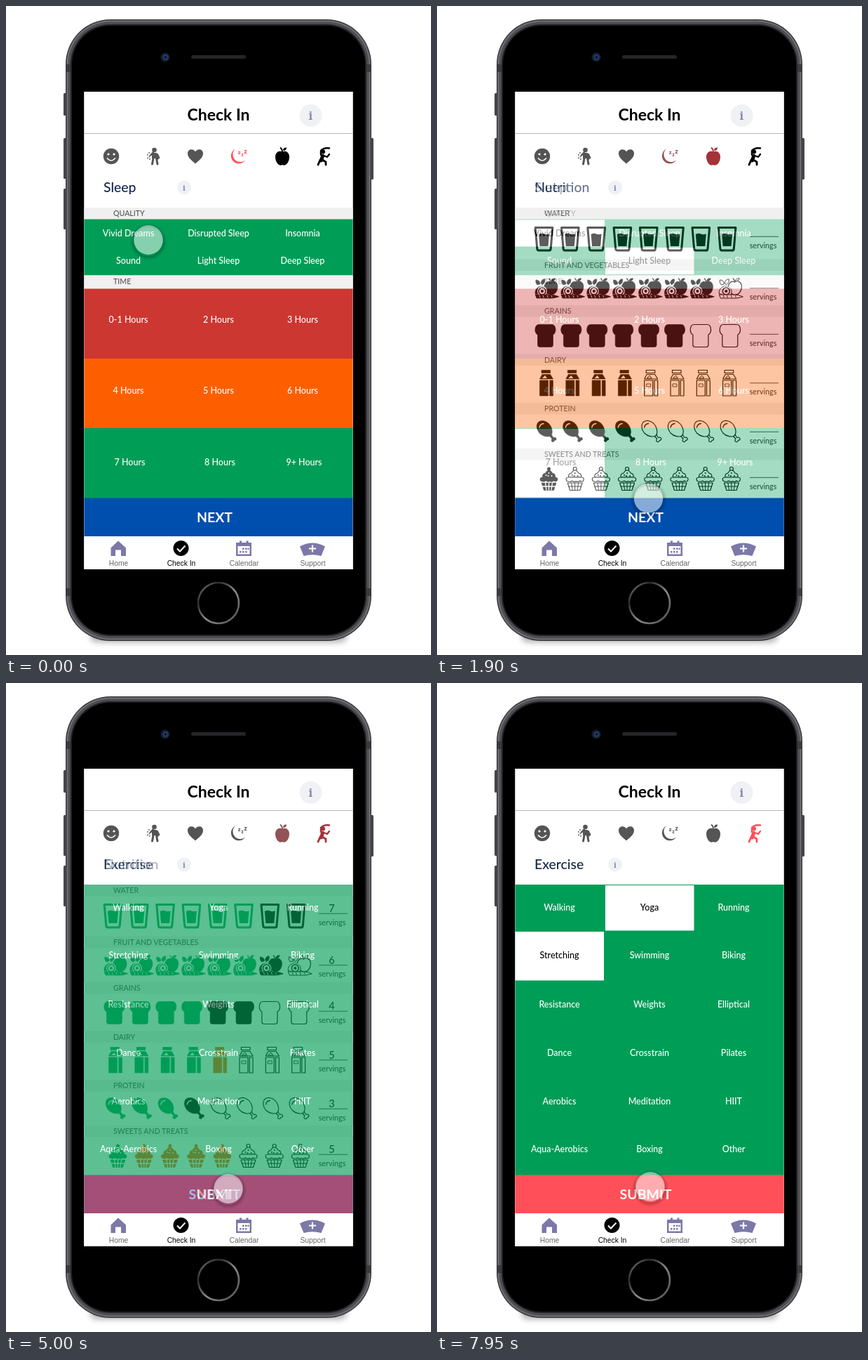
An HTML page that plays this animation: 606 by 924 pixels, repeating every 8 s.

```html
<!DOCTYPE html>
<html lang="en">
<head>
<meta charset="utf-8">
<title>Daily check-in</title>
<style>
html, body { margin: 0; width: 100%; height: 100%; overflow: hidden; background: #fff; }
svg { display: block; width: 100vw; height: 100vh; }
text { font-family: Lato, "Open Sans", sans-serif; font-weight: 500; }
.nav text { font: 10.3px "Liberation Sans", Arial, sans-serif; fill: #666; }
.serif { font-family: "Noto Serif", serif; font-weight: 700; }
</style>
</head>
<body>
<svg viewBox="0 0 606 924" xmlns="http://www.w3.org/2000/svg">
  <defs>
    <linearGradient id="ring" x1="0" y1="0" x2="1" y2="1">
      <stop offset="0" stop-color="#8a8a8a"/><stop offset=".25" stop-color="#2c2c2c"/>
      <stop offset=".55" stop-color="#8c8c8c"/><stop offset="1" stop-color="#4a4a4a"/>
    </linearGradient>
    <radialGradient id="halo">
      <stop offset=".74" stop-color="#000" stop-opacity="0"/>
      <stop offset=".78" stop-color="#000" stop-opacity=".24"/>
      <stop offset="1" stop-color="#000" stop-opacity="0"/>
    </radialGradient>
    <filter id="soft" x="-10%" y="-100%" width="120%" height="300%"><feGaussianBlur stdDeviation="4"/></filter>
    <clipPath id="glass"><rect x="111.5" y="122" width="383" height="680"/></clipPath>
  </defs>
  <rect width="606" height="924" fill="#fff"/>

  <g id="phone">
    <rect x="120" y="888" width="366" height="18" rx="9" fill="#000" opacity=".3" filter="url(#soft)"/>
    <g fill="#47474c">
      <rect x="82" y="124" width="6" height="32" rx="1.5"/>
      <rect x="82" y="188" width="6" height="58" rx="1.5"/>
      <rect x="82" y="260" width="6" height="58" rx="1.5"/>
      <rect x="518" y="188" width="6" height="59" rx="1.5"/>
    </g>
    <rect x="85" y="19" width="436" height="885" rx="64" fill="#3a3a3e"/>
    <rect x="86.5" y="20.5" width="433" height="882" rx="62.5" fill="#707075"/>
    <rect x="88.5" y="22.5" width="429" height="878" rx="60.5" fill="#4d4d52"/>
    <path d="M85 83h7v11h-7zM514 83h7v11h-7zM85 829h7v11h-7zM514 829h7v11h-7z" fill="#3b3b3f"/>
    <rect x="92" y="26" width="422" height="871" rx="57" fill="#232326"/>
    <rect x="94" y="28" width="418" height="867" rx="55" fill="#000"/>
    <circle cx="227" cy="73" r="6.5" fill="#1b1d27"/>
    <circle cx="227.5" cy="73" r="4" fill="#1d3c70"/>
    <circle cx="227.5" cy="73" r="1.8" fill="#0a1228"/>
    <rect x="264" y="70" width="78" height="5" rx="2.5" fill="#262628"/>
    <circle cx="303" cy="850" r="29" fill="#000" stroke="url(#ring)" stroke-width="2.6"/>
    <rect x="111.5" y="122" width="383" height="680" fill="#fff"/>
  </g>

  <g clip-path="url(#glass)">
    <g id="view"></g>
    <path d="M111 181.5H495" stroke="#b9b9b9" stroke-width="1.2"/>
    <text x="303" y="163" font-size="23" style="font-weight:700" text-anchor="middle">Check In</text>
    <circle cx="434.500" cy="156" r="16" fill="#f0f1f5"/>
    <text class="serif" x="434.500" y="162" font-size="16.500" fill="#8985ae" text-anchor="middle">i</text>
    <g class="nav" fill="#7c78a8" text-anchor="middle">
      <rect x="111" y="755" width="384" height="48" fill="#fff"/>
      <path d="M160 761.500L171 771.500V783H164V774.500H156V783H149.500V771.500Z"/>
      <circle cx="249.500" cy="772" r="11" fill="#000"/>
      <path d="M244 772.500l4 4 7.500-8" fill="none" stroke="#fff" stroke-width="2"/>
      <path fill-rule="evenodd" d="M330 764h3v-2.500h3v2.500h6.500v-2.500h3v2.500h4.500v19h-22v-19zM330.500 769v11.500h17V769z"/>
      <path d="M337 771.500h2.500v2.500H337zM341 771.500h2.500v2.500H341zM344.500 771.500h2v2.500h-2zM333 776h2.500v2.500H333zM337 776h2.500v2.500H337zM341 776h2.500v2.500H341z"/>
      <path d="M419 769.500Q428 764.500 437 764.500T455 769.500L449.500 783Q437 779.500 424.500 783Z"/>
      <path d="M437 767.500v10M432 772.500h10" stroke="#fff" stroke-width="2.200"/>
      <text x="160.500" y="797">Home</text>
      <text x="250" y="797" style="fill:#000">Check In</text>
      <text x="339.500" y="797">Calendar</text>
      <text x="437.500" y="797">Support</text>
    </g>
    <g id="touch">
      <circle cy="2.500" r="26" fill="url(#halo)"/>
      <circle r="20" fill="#fff" fill-opacity=".52" stroke="#fff" stroke-opacity=".3"/>
    </g>
  </g>
</svg>

<script>
const LOOP = 8000;
const GREEN = "#009d57", RED = "#ff5059", ORANGE = "#fd5f00", BLUE = "#004fae", GREY = "#555";
const COLS = [174.5, 303, 423];

// ---------- drawing helpers ----------
const rect = (x, y, w, h, fill) => `<rect x="${x}" y="${y}" width="${w}" height="${h}" fill="${fill}"/>`;
const text = (s, x, y, size, fill, anchor = "middle", weight = 500) =>
  `<text x="${x}" y="${y}" font-size="${size}" fill="${fill}" text-anchor="${anchor}" style="font-weight:${weight}">${s}</text>`;
const path = (d, more = "") => `<path d="${d}" ${more}/>`;
const line = (d, w, color = "currentColor") =>
  path(d, `fill="none" stroke="${color}" stroke-width="${w}" stroke-linecap="round" stroke-linejoin="round"`);
const dot = (x, y, r, more = "") => `<circle cx="${x}" cy="${y}" r="${r}" ${more}/>`;
const at = (x, y, color, body) =>
  `<g transform="translate(${x} ${y})" color="${color}" fill="currentColor">${body}</g>`;
const shape = (on, d, w = 1.2) => path(d, on
  ? `stroke="currentColor" stroke-width=".6"`
  : `fill="#fff" stroke="currentColor" stroke-width="${w}" stroke-linejoin="round"`);

// ---------- tab icons ----------
const smile = dot(0, 0, 11.2) + dot(-4, -3, 1.6, 'fill="#fff"') + dot(4, -3, 1.6, 'fill="#fff"') +
  line("M-5.5 3Q0 9 5.500 3", 1.7, "#fff");
const cough = dot(1.5, -9, 3.3) + path("M-2-5H4Q7-4 7 0V3H-2Z") +
  line("M0 3L-1.500 11M4.500 3L6 11", 3) + line("M-1.500-3L-4.500-1 0-6", 2) + line("M6-3L8.500 2 6 4", 1.8) +
  [[-6, -5], [-8, -2], [-5.5, 0.5], [-8, 2.5], [-5, 4]].map(p => dot(...p, .9)).join("");
const heart = path("M0 10.500C-7 4.500-11 1-11-4C-11-10.500-3-11.500 0-6.500C3-11.500 11-10.500 11-4C11 1 7 4.500 0 10.500Z");
const moon = path("M-4-10.500A11 11 0 1 0 10 5.500A10.500 10.500 0 0 1-4-10.500Z") +
  text("z", 1.5, -3, 8, "currentColor", "middle", 900) + text("z", 6, 0, 6.5, "currentColor", "middle", 900) +
  text("z", 10.5, -4, 9, "currentColor", "middle", 900);
const apple = path("M0-6C-4-9-10-6-10 1C-10 8-5 14-1.500 12.500Q0 12 1.500 12.500C5 14 10 8 10 1C10-6 4-9 0-6Z") +
  path("M1-8Q1-13 6-12.500Q6-8 1-8Z") + line("M0-6Q0-10-2.500-12", 1.8);
const stretch = dot(-1, -6.5, 3.1) + line("M-1.500-.500L-3.500 6", 5) +
  line("M-5 5L-8 12M-2 5L3 8 3 12", 2.8) + line("M-4-2L-4-8Q1-13 8-11.500", 2.5) + line("M0-1L5 1 8-3", 2.2);

function tabs(colors) {
  const icons = [smile, cough, heart, moon, apple, stretch], xs = [150, 210, 270, 331, 394, 453];
  return icons.map((icon, i) => at(xs[i], 214, colors[i], icon)).join("");
}
function page(title, colors, body, action, actionFill) {
  return rect(111, 122, 384, 680, "#fff") + tabs(colors) +
    text(title, 139, 264.5, 19.4, "#14284b", "start") +
    dot(254, 258.5, 10, 'fill="#f0f1f5"') +
    `<text class="serif" x="254" y="262.500" font-size="11" fill="#8985ae" text-anchor="middle">i</text>` +
    body + rect(111, 700.5, 384, 55, actionFill) + text(action, 297.5, 734.5, 19.5, "#fff", "middle", 700);
}
const band = (s, y, h = 16.5) => rect(111, y, 384, h, "#f0f0f0") + text(s, 153, y + 12, 10.6, "#555", "start");
const cell = (s, x, y, on, box) =>
  (on ? rect(...box, "#fff") : "") + text(s, x, y, 12.5, on ? "#000" : "#fff");

// ---------- sleep ----------
function sleepPage(t) {
  const white = {
    "Vivid Dreams": [300, [111, 304.5, 128, 38]],
    "Light Sleep": [700, [240, 344, 126.5, 38]],
    "7 Hours": [1200, [111, 602, 128, 97.5]]
  };
  const row = (names, y, dx = 0) => names.map((s, i) =>
    cell(s, COLS[i] + dx, y, white[s] && t >= white[s][0], white[s] && white[s][1])).join("");
  const body = band("QUALITY", 287) + rect(111, 303.5, 384, 80, GREEN) + band("TIME", 383.5, 19) +
    rect(111, 402.5, 384, 99.5, "#cc3731") + rect(111, 502, 384, 99, ORANGE) + rect(111, 601, 384, 100, GREEN) +
    row(["Vivid Dreams", "Disrupted Sleep", "Insomnia"], 328) +
    row(["Sound", "Light Sleep", "Deep Sleep"], 367) +
    row(["0-1 Hours", "2 Hours", "3 Hours"], 451) +
    row(["4 Hours", "5 Hours", "6 Hours"], 552) +
    row(["7 Hours", "8 Hours", "9+ Hours"], 653.5, 2);
  return page("Sleep", [GREY, GREY, GREY, RED, "#000", "#000"], body, "NEXT", BLUE);
}

// ---------- nutrition ----------
const food = {
  water: () => line("M-12.300-16H12.300L9.700 14Q9.500 16.500 7.200 16.500H-7.200Q-9.500 16.500-9.700 14Z", 3) +
    path("M-7.500-6.500Q-3-8.500 0-7T7.500-7L6 10.500H-6Z"),
  fruit: on => shape(on, "M6-9C10-12 17-9 16-1C15 6 11 10 5 9L-3 5C-5-5 0-12 6-9Z") +
    line("M6-9Q6-12 4-14", 1.3) + shape(on, "M7-10Q8-15 13-14Q12-10 7-10Z", 1) +
    shape(on, "M-15-12Q-9-12-9-6L-13-5Q-16-8-15-12Z", 1) + shape(on, "M-8-8Q-6-14-2-13Q-1-8-6-5Z", 1) +
    shape(on, "M-16 8Q-17 0-9-3Q0-4 2 4L1 9Z", 1) +
    dot(-6, 4, 7, 'fill="#fff"') + line("M-11 4a5 5 0 1 0 10 0a5 5 0 1 0-10 0", 1.5) + dot(-6, 4, 2) +
    shape(on, "M-16 9L2 9Q13 9 18 12Q10 15-2 14H-14Z", 1) +
    line("M-10 10l1 3M-5 10l1 3M1 10l1 3M7 10.500l1 2", .9, on ? "#fff" : "currentColor"),
  grains: on => shape(on, "M-9.500-16H9.500C15.500-16 16.500-4 11-1.500V13Q11 16 8 16H-8Q-11 16-11 13V-1.500C-16.500-4-15.500-16-9.500-16Z"),
  dairy: on => shape(on, "M-7-18.500H5.500V-14.500H-7Z") + shape(on, "M-6-12.500H5.500L9.500-6H-9.500Z") +
    path("M-6-7L-2-11 1-7Z", `fill="#fff" stroke="${on ? "none" : "currentColor"}"`) +
    shape(on, "M-9.500-4H2.500V18H-9.500Z") + shape(on, "M4.700-4H9.500V18H4.700Z") +
    path("M-6.500 1H-.500V5H-6.500Z", `fill="${on ? "currentColor" : "#fff"}" stroke="currentColor" stroke-width=".8"`),
  protein: on => shape(on, "M4 7L8 11Q6 15 9 15.500Q11 16 11.500 13.500Q15 13 14 10.500Q13 8.500 10 9.500L7 5Z") +
    shape(on, "M-12-12C-7-17 2-14 6-7C9-1 9 4 6 7C2 9-5 8-10 3C-14-2-15-8-12-12Z") +
    line("M-10-5Q-9-10-4-10.500", 1.3, on ? "#fff" : "currentColor"),
  sweets: on => dot(0, -14, 2.5, on ? "" : 'fill="#fff" stroke="currentColor" stroke-width="1.200"') +
    shape(on, "M-9-2Q-10-7-5-8Q-3-12 0-12T5-8Q10-7 9-2Z") +
    shape(on, "M-12 3Q-14-2-9-2H9Q14-2 12 3Q9 5 7 3Q4 5.500 1.500 3.500Q-1 5.500-4 3Q-7 5.500-12 3Z") +
    [[-4, -5], [0, -8], [4, -4], [-1, -4]].map(p => dot(...p, 1, on ? 'fill="#fff"' : "")).join("") +
    shape(on, "M-10.500 6H10.500L7 16.500H-7Z") +
    line("M-5 6L-3.500 16M0 6V16M5 6L3.500 16M-9 11H9", on ? 1.3 : 1, on ? "#fff" : "currentColor")
};
// label, icon, band top, icon row centre, first x, pitch, last offset, advised, lit, count, tap time
const meals = [
  ["WATER", "water", 287, 331.5, 152.5, 37.3, 0, 8, 6, 7, 2500],
  ["FRUIT AND VEGETABLES", "fruit", 360.5, 402, 156, 36.9, 4, 7, 6, 6, 3000],
  ["GRAINS", "grains", 426, 469.5, 154.5, 36.9, 5, 6, 4, 4, 3300],
  ["DAIRY", "dairy", 495.5, 537, 156, 37.3, 0, 4, 5, 5, 3600],
  ["PROTEIN", "protein", 565, 605, 156, 37.4, 0, 4, 3, 3, 3900],
  ["SWEETS AND TREATS", "sweets", 630, 673, 159.5, 37.2, 0, 1, 5, 5, 4500]
];
function mealRow([label, kind, top, y, x0, pitch, last, advised, lit, count, tap], t) {
  const done = t >= tap, rule = top + 41.3;
  let out = band(label, top);
  for (let i = 0; i < 8; i++) {
    const chosen = done && i < lit;
    const color = !chosen ? "#000" : i < advised ? GREEN : ORANGE;
    out += at(x0 + pitch * i + (i === 7 ? last : 0), y, color, food[kind](i < advised || chosen));
  }
  if (done) out += text(count, 464.5, rule - 2.3, 14.5, "#111");
  return out + path(`M446 ${rule}H487`, 'stroke="#444" stroke-width="1"') + text("servings", 465, rule + 16.3, 10.7, "#333");
}
const nutritionPage = t => page("Nutrition", [GREY, GREY, GREY, GREY, RED, "#000"],
  meals.map(m => mealRow(m, t)).join(""), "NEXT", BLUE);

// ---------- exercise ----------
const sports = ["Walking", "Yoga", "Running", "Stretching", "Swimming", "Biking", "Resistance", "Weights", "Elliptical",
  "Dance", "Crosstrain", "Pilates", "Aerobics", "Meditation", "HIIT", "Aqua-Aerobics", "Boxing", "Other"];
const sportRows = [324, 392, 462, 531, 600, 668];
function exercisePage(t) {
  const white = { Yoga: [7200, [240, 288, 126.5, 64.5]], Stretching: [7500, [111, 354, 127, 69.5]] };
  const cells = sports.map((s, i) =>
    cell(s, COLS[i % 3], sportRows[i / 3 | 0], white[s] && t >= white[s][0], white[s] && white[s][1]));
  return page("Exercise", [GREY, GREY, GREY, GREY, GREY, RED],
    rect(111, 287, 384, 414, GREEN) + cells.join(""), "SUBMIT", RED);
}

// ---------- motion ----------
const stops = [
  [0, 203, 333], [200, 192, 331], [300, 192, 331], [600, 302, 366], [700, 302, 366], [1100, 185, 650], [1200, 185, 650],
  [1600, 299, 729], [1800, 299, 729], [2400, 333, 347], [2700, 333, 347], [3000, 340, 405], [3100, 340, 405],
  [3300, 268, 470], [3400, 268, 470], [3600, 305, 540], [3700, 305, 540], [3900, 232, 605], [4000, 232, 605],
  [4200, 305, 669], [4500, 305, 669], [4700, 317, 720], [5300, 317, 720], [6200, 318, 380], [6900, 318, 380],
  [7050, 306, 362], [7200, 290, 338], [7350, 175, 385], [7500, 175, 385], [7650, 295, 560], [7800, 304, 712], [7950, 304, 717]
];
const presses = [200, 700, 1200, 1700, 2500, 3000, 3300, 3600, 3900, 4500, 4800, 7200, 7500];
const smooth = p => p * p * (3 - 2 * p);

function touchAt(t) {
  const i = Math.max(1, stops.findIndex(s => s[0] >= t));
  const [t0, x0, y0] = stops[i - 1], [t1, x1, y1] = stops[i];
  const p = smooth((t - t0) / (t1 - t0));
  return [x0 + (x1 - x0) * p, y0 + (y1 - y0) * p];
}
function fade(t, start) {
  const p = Math.min(1, Math.max(0, (t - start) / 500));
  return 1 - (1 - p) ** 2;
}

const pages = [[sleepPage, -500], [nutritionPage, 1700], [exercisePage, 4800]];
const view = document.getElementById("view"), touch = document.getElementById("touch");
let shown = -1;

function draw(t) {
  if (t === shown) return;
  shown = t;
  view.innerHTML = pages.map(([build, start], i) => {
    const alpha = fade(t, start), next = pages[i + 1];
    const covered = next && fade(t, next[1]) === 1;
    return alpha && !covered ? `<g opacity="${alpha}">${build(t)}</g>` : "";
  }).join("");
  const [x, y] = touchAt(t);
  touch.setAttribute("transform", `translate(${x} ${y}) scale(${presses.includes(t) ? .95 : 1.02})`);
}

// The picture advances in steps, slower near the end.
function tick() {
  const t = performance.now() % LOOP, step = t < 6900 ? 100 : 150;
  draw(Math.floor(t / step) * step);
  requestAnimationFrame(tick);
}
tick();
</script>
</body>
</html>
```
